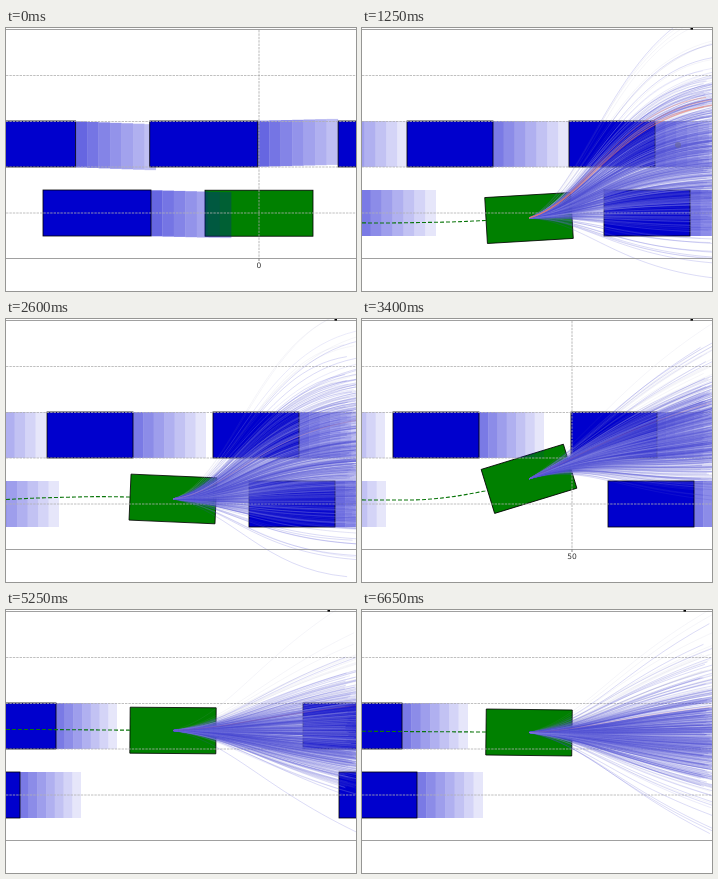
Recreate the animation shown at these times as an HTML page with a canvas. Size 350 by 263 pixels, loop 6700 ms.

```html
<!DOCTYPE html>
<html lang="en">
<head>
<meta charset="utf-8">
<title>Lane change planner</title>
<style>
  html, body { margin: 0; width: 100%; height: 100%; overflow: hidden; background: #fff; }
  #stage { position: absolute; left: 0; top: 0; width: 350px; height: 263px; overflow: hidden; }
  canvas { position: absolute; left: 0; top: 0; width: 350px; height: 263px; }
  .tick {
    position: absolute; top: 233px; width: 40px; margin-left: -20px;
    text-align: center; color: #333;
    font: 7.5px/10px "DejaVu Sans", sans-serif;
  }
</style>
</head>
<body>
<div id="stage">
  <canvas id="view"></canvas>
  <div class="tick" id="tick0">0</div>
  <div class="tick" id="tick50">50</div>
</div>
<script>
const W = 350, H = 263, STEP = 50, STEPS = 134;
const EGO_X = 167, CAR_W = 86, CAR_H = 46, UPPER = 116, LOWER = 185;
const PX_PER_M = 17.2;

const canvas = document.getElementById('view');
const ratio = window.devicePixelRatio || 1;
canvas.width = W * ratio;
canvas.height = H * ratio;
const ctx = canvas.getContext('2d');
const ticks = [[0, document.getElementById('tick0')], [50, document.getElementById('tick50')]];

// Values below are given at these steps and interpolated between them.
const KEYS = [0, 25, 52, 68, 91, 105, 133];
const DISTANCE = [0, 300, 624, 817, 1035, 1168, 1434];
const TRAIL = [64, 76, 73, 65, 57, 61, 66];
const CARS = [
  { y: UPPER, x: [-65, -116, -119, -128, -200, -220, -240], sway: 0.45 },
  { y: UPPER, x: [80, 45, 41, 31, -31, -36, -46], sway: -0.3 },
  { y: UPPER, x: [230, 207, 207, 209, 259, 297, 380], sway: 0 },
  { y: LOWER, x: [-5, -88, -106, -127, -91, -72, -31], sway: 0.3 },
  { y: LOWER, x: [248, 242, 243, 246, 294, 333, 415], sway: 0 }
];
const FAN = {
  end: [150, 130, 140, 112, 122, 126, 126],
  spread: [36, 38, 34, 25, 24, 24, 24],
  bend: [0.85, 0.9, 0.9, 0.6, 0.55, 0.55, 0.55]
};

// Driven path: distance along the road and height on the stage.
const PATH_D = [0, 60, 133, 163, 223, 257, 300, 457, 487, 547, 581, 624, 650, 710,
  740, 774, 817, 868, 898, 928, 958, 992, 1035, 1168, 1300, 1391, 1434, 1460];
const PATH_Y = [185, 190, 195, 195, 194, 192.5, 190, 180.5, 179, 177.5, 178, 180, 181, 181,
  178, 172, 160, 142, 130, 123, 120, 119.5, 119.5, 120.5, 121.5, 122, 122.5, 122.8];

function track(keys, values, at) {
  if (at <= keys[0]) return values[0];
  for (let i = 1; i < keys.length; i++) {
    if (at <= keys[i]) {
      const k = (at - keys[i - 1]) / (keys[i] - keys[i - 1]);
      return values[i - 1] + (values[i] - values[i - 1]) * k;
    }
  }
  return values[values.length - 1];
}

const keyed = (values, step) => track(KEYS, values, step);
const rawPath = d => track(PATH_D, PATH_Y, d);
const pathY = d => (rawPath(d - 10) + 2 * rawPath(d) + rawPath(d + 10)) / 4;
const slopeAt = d => (pathY(d + 12) - pathY(d - 20)) / 32;

function randomizer(seed) {
  let s = seed * 7919 + 17;
  return () => {
    s = (s + 0x6D2B79F5) | 0;
    let v = Math.imul(s ^ (s >>> 15), 1 | s);
    v = (v + Math.imul(v ^ (v >>> 7), 61 | v)) ^ v;
    return ((v ^ (v >>> 14)) >>> 0) / 4294967296;
  };
}

function line(x1, y1, x2, y2, color, width, dash = []) {
  ctx.strokeStyle = color;
  ctx.lineWidth = width;
  ctx.setLineDash(dash);
  ctx.beginPath();
  ctx.moveTo(x1, y1);
  ctx.lineTo(x2, y2);
  ctx.stroke();
  ctx.setLineDash([]);
}

function box(x, y, w, fill) {
  ctx.fillStyle = fill;
  ctx.fillRect(x, y, w, CAR_H);
  ctx.strokeStyle = '#000';
  ctx.lineWidth = 0.8;
  ctx.strokeRect(x, y, w, CAR_H);
}

function drawHistory(d) {
  ctx.strokeStyle = '#0a750a';
  ctx.lineWidth = 1.1;
  ctx.setLineDash([4, 2]);
  ctx.beginPath();
  for (let x = Math.max(0, EGO_X - d); x <= EGO_X; x += 3) ctx.lineTo(x, pathY(d - EGO_X + x));
  ctx.stroke();
  ctx.setLineDash([]);
}

function drawEgo(x, y, w, angle) {
  ctx.save();
  ctx.translate(x, y);
  ctx.rotate(angle);
  box(-w / 2, -CAR_H / 2, w, '#008000');
  ctx.restore();
}

function drawTrail(x, y, length, sway, first, last) {
  const n = 7, w = length / n;
  for (let i = 0; i < n; i++) {
    ctx.fillStyle = `rgba(0,0,205,${first + (last - first) * i / (n - 1)})`;
    ctx.fillRect(x + i * w, y - CAR_H / 2 + sway * (i + 1), w, CAR_H);
  }
}

function drawFan(step, d) {
  const rnd = randomizer(step);
  const gauss = () => (rnd() + rnd() + rnd() + rnd() - 2) * 1.73;
  const y0 = pathY(d), slope = slopeAt(d);
  const end = keyed(FAN.end, step), spread = keyed(FAN.spread, step), bend = keyed(FAN.bend, step);

  function curve(endY, color, width) {
    const rise = endY - y0;
    ctx.strokeStyle = color;
    ctx.lineWidth = width;
    ctx.beginPath();
    ctx.moveTo(EGO_X, y0);
    ctx.bezierCurveTo(
      227, y0 + 60 * slope + 0.12 * rise,
      250 + rnd() * 8, y0 + bend * rise,
      338 + rnd() * 45, endY);
    ctx.stroke();
  }

  for (let i = 0; i < 45; i++) curve(end - 35 + gauss() * 48, 'rgba(150,150,185,.16)', 0.6);
  for (let i = 0; i < 480; i++) {
    const wide = rnd() < 0.12 ? 1.7 : 1;
    const color = rnd() < 0.8 ? 'rgba(72,72,205,.3)' : 'rgba(165,165,232,.35)';
    curve(end + gauss() * spread * wide, color, 0.65);
  }
  const reds = step < 40 ? 5 : 1;
  for (let i = 0; i < reds; i++) {
    curve(end - spread * 1.45 + gauss() * 4, `rgba(235,125,105,${reds > 1 ? 0.6 : 0.25})`, 0.7);
  }
}

function draw(step) {
  const intro = step === 0;
  const zoom = intro ? 108 / CAR_W : 1;
  const egoX = intro ? 253 : EGO_X;
  const toX = x => egoX + (x - EGO_X) * zoom;
  const d = keyed(DISTANCE, step);

  ctx.setTransform(ratio, 0, 0, ratio, 0, 0);
  ctx.fillStyle = '#fff';
  ctx.fillRect(0, 0, W, H);

  const cars = CARS.map(c => ({ ...c, left: toX(keyed(c.x, step)) }));
  const carW = CAR_W * zoom, trail = keyed(TRAIL, step) * zoom;

  // The road history passes over cars but under the ego vehicle.
  drawEgo(egoX, pathY(d), carW, intro ? 0 : Math.atan(slopeAt(d)));
  for (const c of cars) {
    drawTrail(c.left + carW, c.y, trail, intro ? c.sway : 0, intro ? 0.6 : 0.52, intro ? 0.25 : 0.1);
  }
  for (const c of cars) box(c.left, c.y - CAR_H / 2, carW, '#0000cd');
  if (!intro) {
    ctx.save();
    ctx.beginPath();
    ctx.rect(0, 0, EGO_X - CAR_W / 2, H);
    ctx.clip();
    drawHistory(d);
    ctx.restore();
  }

  for (const y of [47.5, 93.5, 139, 185]) line(0, y, W, y, '#b0b0b0', 0.8, [2.4, 1]);
  for (const [value, label] of ticks) {
    const x = egoX + (value * PX_PER_M - d) * zoom;
    const shown = x > -10 && x < W + 10;
    label.style.display = shown ? 'block' : 'none';
    label.style.left = x + 'px';
    if (shown) {
      line(x, 2, x, 230, '#a8a8a8', 0.8, [2.4, 1]);
      line(x, 230, x, 233, '#555', 0.7);
    }
  }

  if (!intro) drawFan(step, d);
  if (step > 21 && step < 29) {
    ctx.fillStyle = 'rgba(100,100,150,.6)';
    ctx.beginPath();
    ctx.arc(316, 117, 3, 0, Math.PI * 2);
    ctx.fill();
  }

  line(0, 1.5, W, 1.5, '#888', 0.8);
  line(0, 230.5, W, 230.5, '#888', 0.8);
  if (!intro) {
    ctx.fillStyle = '#000';
    ctx.fillRect(step < 98 ? 328.5 : 321.5, 0, 2.5, 1.6);
  }
}

let start = null, shownStep = -1;
function tick(now) {
  if (start === null) start = now;
  const step = Math.floor((now - start) / STEP) % STEPS;
  if (step !== shownStep) {
    shownStep = step;
    draw(step);
  }
  requestAnimationFrame(tick);
}
draw(0);
requestAnimationFrame(tick);
</script>
</body>
</html>
```
